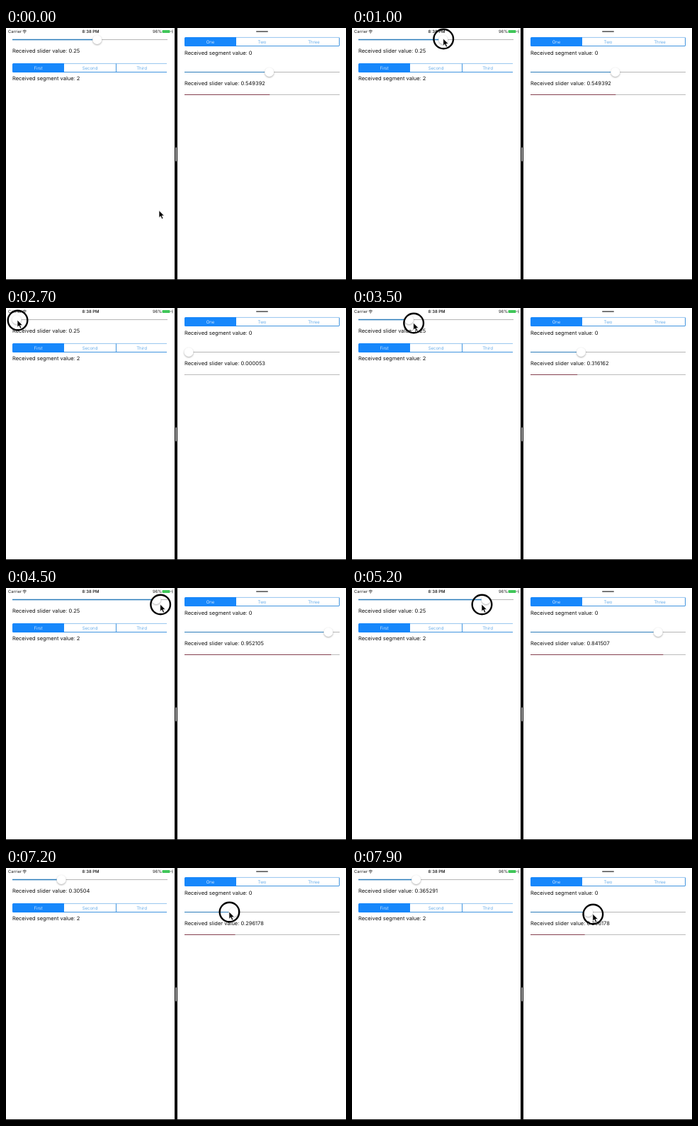
These frames come from a looping animation (480x357 px, 8 s). An HTML page:

```html
<!DOCTYPE html>
<html lang="en">
<head>
<meta charset="utf-8">
<title>Linked sliders</title>
<style>
  html, body { margin: 0; width: 100%; height: 100%; overflow: hidden; background: #fff; }
  svg { display: block; width: 480px; height: 357px; }
  text { font: 7.5px Inter, Roboto, sans-serif; fill: #111; text-rendering: geometricPrecision; }
  .status text { font-size: 5.9px; fill: #222; }
  .status .clock { font-weight: 600; text-anchor: middle; }
  .tabs text { font-size: 6.1px; font-weight: 300; fill: #3792e2; text-anchor: middle; }
  .tabs text.on { fill: #fff; }
  .thumb { fill: #fff; filter: drop-shadow(0 1.2px 1.2px #0005); }
</style>
</head>
<body>
<svg viewBox="0 0 480 357">
  <rect width="480" height="357" fill="#fff"/>

  <g class="status">
    <text x="3" y="7">Carrier</text>
    <g fill="none" stroke="#222">
      <path d="M23.6 4.2q2.6-2.2 5.2 0M24.6 5.6q1.6-1.3 3.2 0" stroke-width=".9"/>
      <path d="M25.6 7h1.2" stroke-width="1.2"/>
    </g>
    <text class="clock" x="119.5" y="7">8:38 PM</text>
    <text x="207" y="7">96%</text>
    <rect x="220.5" y="3" width="11" height="4" rx="1" fill="#3fc659"/>
    <path d="M232.3 4v1.6" stroke="#777" stroke-width=".8"/>
    <path d="M235.3 2.5l-1.4 2.6h1.5l-.7 2.3" fill="none" stroke="#333" stroke-width=".6"/>
  </g>

  <g id="left">
    <text x="9" y="35" class="received"></text>
    <text x="9" y="74.2">Received segment value: 2</text>
  </g>
  <g id="right">
    <text x="252" y="38">Received segment value: 0</text>
    <text x="252" y="80.5" class="received"></text>
    <path d="M252 94.5H471" stroke="#bbb"/>
    <path id="progress" stroke="#85404f"/>
  </g>

  <rect x="353" y="4" width="17" height="2" rx="1" fill="#777"/>
  <rect x="238" width="4" height="357"/>
  <rect x="239.2" y="169" width="1.8" height="20" rx=".9" fill="#bbb"/>
  <rect y="356" width="480" height="1" fill="#111"/>

  <g id="pointer">
    <circle id="ring" cx=".5" cy=".5" r="13.8" fill="none" stroke="#000" stroke-width="2.4"/>
    <path d="M0 0V10.2L2.3 8.1L4 12L5.9 11.2L4.2 7.4H7.4Z" stroke="#fff" stroke-width=".7"/>
  </g>
</svg>
<script>
const LOOP = 8000, STEP = 100;
const PRESS = 400, RELEASE = 6300, PRESS_RIGHT = 6900;
const FIRST = .549392, SENT = .296178;

// Turning points of the drag: [ms, slider value]
const TURNS = [
  [PRESS, FIRST], [600, .785], [900, FIRST], [1585, FIRST], [2707, 0], [4793, 1],
  [6086, SENT], [PRESS_RIGHT, SENT], [7050, .4], [7459, .08], [8100, .4465]
];

const $ = selector => document.querySelector(selector);
const clamp = (v, lo, hi) => Math.min(hi, Math.max(lo, v));
const mix = (a, b, f) => a + (b - a) * f;
const ease = (t, from, to) => (1 - Math.cos(Math.PI * clamp((t - from) / (to - from), 0, 1))) / 2;

const valueAt = t => TURNS.reduce((v, [end, next], i) =>
  i ? mix(v, next, ease(t, TURNS[i - 1][0], end)) : next, FIRST);

const thumbX = (x, v) => x + 6 + 207 * v;

// The pointer runs slightly ahead of the thumb and flies between the sliders.
function pointerAt(t) {
  const v = valueAt(t), hand = v + clamp(valueAt(t + STEP) - v, -.03, .03);
  const arrive = ease(t, 0, PRESS), cross = ease(t, RELEASE, PRESS_RIGHT);
  const leftY = 15 + 8 * ease(t, 1900, 4300), rightY = 62 + 3 * ease(t, 7200, 7900);
  return [
    mix(mix(216, thumbX(9, hand), arrive), thumbX(252, hand), cross),
    mix(mix(258.5, leftY, arrive), rightY, cross)
  ];
}

function addTabs(parent, x, y, edge, names) {
  const labels = names.map((name, i) =>
    `<text class="${i ? '' : 'on'}" x="${x + 36.5 + i * 73}" y="${y + 8.7}">${name}</text>`);
  parent.insertAdjacentHTML('beforeend', `<g class="tabs">
    <g fill="none" stroke="#2b88dc">
      <path d="M${x + 1} ${y + .4}h217" stroke-width=".5"/>
      <path d="M${x + 1} ${y + 12.5}h217" stroke-width=".9"/>
      <path d="M${x + edge} ${y + .5}v12" stroke-width=".9"/>
    </g>
    <path d="M${x + 73} ${y}h-71.5q-1.5 0-1.5 1.5v10q0 1.5 1.5 1.5h71.5z" fill="#1787fb"/>
    ${labels.join('')}</g>`);
}

function addSlider(parent, x, y, weight) {
  parent.insertAdjacentHTML('beforeend', `
    <path d="M${x} ${y}h219" stroke="#b5b5b5"/>
    <path class="fill" stroke="#2b7cba" stroke-width="${weight}"/>
    <circle class="thumb" cy="${y}" r="6.5"/>`);
  const fill = parent.querySelector('.fill'), thumb = parent.querySelector('.thumb');
  return v => {
    const cx = thumbX(x, v);
    fill.setAttribute('d', `M${x} ${y}H${cx}`);
    thumb.setAttribute('cx', cx);
  };
}

const left = $('#left'), right = $('#right');
addTabs(left, 9, 50, 146.5, ['First', 'Second', 'Third']);
addTabs(right, 252, 13, 218.5, ['One', 'Two', 'Three']);
const setLeft = addSlider(left, 9, 16.5, 1.7);
const setRight = addSlider(right, 252, 62.5, 1);

function showReceived(pane, v) {
  pane.querySelector('.received').textContent = 'Received slider value: ' + +v.toFixed(6);
}

function draw(t) {
  const v = valueAt(t), [x, y] = pointerAt(t);
  const onRight = t >= PRESS_RIGHT;
  setLeft(v);
  setRight(v);
  showReceived(left, onRight ? v : .25);
  showReceived(right, onRight ? SENT : v);
  $('#progress').setAttribute('d', `M252 94.5H${252 + 219 * valueAt(t - 20)}`);
  $('#pointer').setAttribute('transform', `translate(${x} ${y})`);
  const pressed = onRight || (t >= PRESS && t < RELEASE);
  $('#ring').style.display = pressed ? '' : 'none';
}

const start = performance.now();
function tick() {
  const t = (performance.now() - start) % LOOP;
  draw(Math.floor(t / STEP) * STEP);
  requestAnimationFrame(tick);
}
tick();
</script>
</body>
</html>
```
